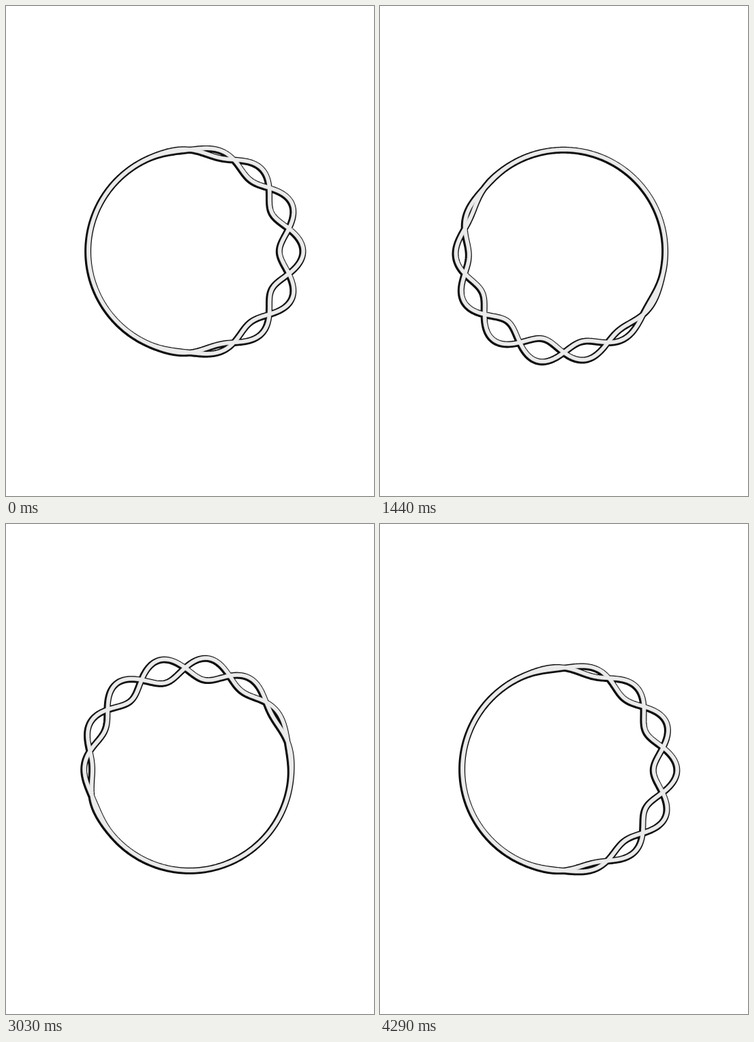
An HTML page for the animation above (4320 ms loop, 540 by 720 pixels).

```html
<!DOCTYPE html>
<html lang="en">
<head>
<meta charset="utf-8">
<title>Braided ring</title>
<style>
  html, body { margin: 0; width: 100%; height: 100%; overflow: hidden; background: #fff; }
  svg { display: block; width: 100%; height: 100%; }
  path { fill: none; stroke-linejoin: round; }
</style>
</head>
<body>
<svg viewBox="0 0 540 720">
  <g transform="translate(270 360)">
    <path transform="translate(-.9 .8)" stroke="#0c0c0c" stroke-width="10"/>
    <path stroke="#b4b4b4" stroke-width="6"/>
    <path stroke="#ebebeb" stroke-width="4.8"/>
  </g>
</svg>
<script>
  const LOOP = 4320, STEP = 30;
  const RADIUS = 149, SWING = 17.3, WAVES = 7;
  const REACH = 126 * Math.PI / 180;
  const POINTS = 480, TAU = Math.PI * 2;
  const layers = document.querySelectorAll('path');

  // Full at the centre of the braid, fading to zero at REACH on both sides
  function envelope(angle) {
    const distance = Math.abs(Math.atan2(Math.sin(angle), Math.cos(angle)));
    const x = Math.max(0, 1 - distance / REACH);
    return x * x * x * (x * (6 * x - 15) + 10);
  }

  function strand(turn, side) {
    let d = '';
    for (let i = 0; i < POINTS; i++) {
      const a = i / POINTS * TAU;
      const wave = Math.cos(WAVES * a + 3 * Math.PI * turn);
      const r = RADIUS + side * SWING * envelope(a - turn * TAU) * wave;
      d += (i ? 'L' : 'M') + (r * Math.cos(a)).toFixed(2) + ' ' + (r * Math.sin(a)).toFixed(2);
    }
    return d + 'Z';
  }

  function draw(ms) {
    const turn = Math.floor(ms % LOOP / STEP) * STEP / LOOP;
    const d = strand(turn, 1) + strand(turn, -1);
    layers.forEach(layer => layer.setAttribute('d', d));
  }

  let start;
  function tick(now) {
    start ??= now;
    draw(now - start);
    requestAnimationFrame(tick);
  }
  draw(0);
  requestAnimationFrame(tick);
</script>
</body>
</html>
```
